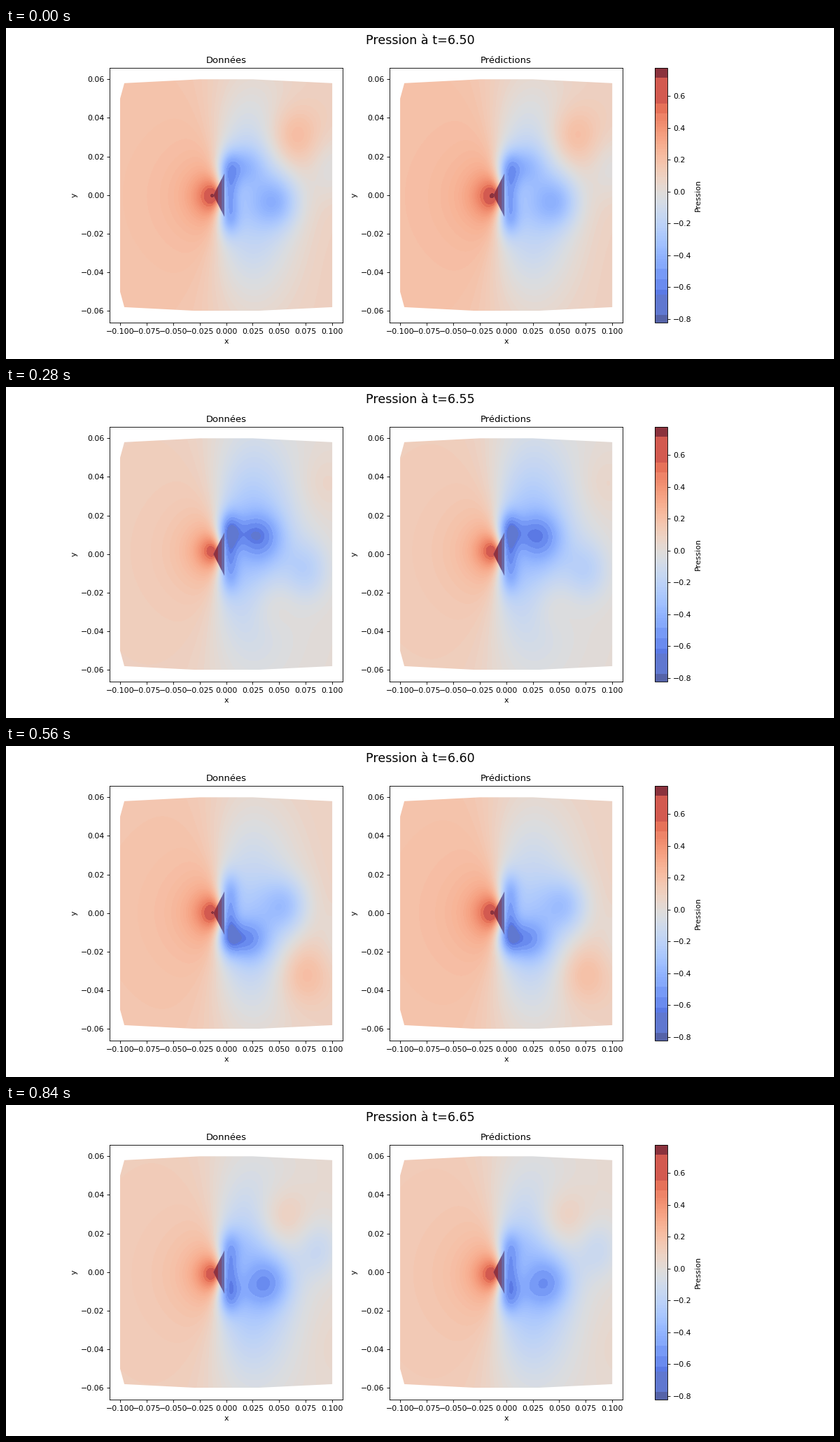
These frames come from a looping animation (1183 by 473 pixels, 0.98 s). A matplotlib script:

```python
import numpy as np
import matplotlib.pyplot as plt
from matplotlib.animation import FuncAnimation
from matplotlib.cm import ScalarMappable
from matplotlib.colors import ListedColormap, Normalize, to_rgba

FRAMES, STEP = 7, 140
W, H, DPI = 1183, 473, 1183 / 15
PMIN, PMAX, LEVELS = -0.824, 0.777, 100
PERIOD = 6.7                      # vortex shedding, in frames
TIDE = 3.6                        # rise and fall of the mean pressure
KX, KY = 1515.5, 2759.0           # pixels per data unit

plt.rcParams["font.family"] = "DejaVu Sans"

x = np.linspace(-0.1, 0.1, 456)
y = np.linspace(-0.06, 0.06, 498)
U, V = np.meshgrid(x * KX, y * KY)


def bump(u, v, su, sv):
    return np.exp(-((U - u) / su) ** 2 / 2 - ((V - v) / sv) ** 2 / 2)


def bell(value, center, width):
    return np.exp(-((value - center) / width) ** 2)


def swing(frame, lag=0.0):
    return np.sin(2 * np.pi * (frame - lag) / PERIOD)


def vortex(age, sign):
    """Pressure of one vortex, the arm feeding it and the pocket behind it."""
    u = 25 + 10 * age + 1.3 * age ** 2
    v = 26 + 16 * np.cos(2 * np.pi * age / 7.4)
    growth = np.clip((age + 1) / 1.5, 0, 1)
    core = 0.28 * growth * bell(age, 2.2, 4.8)
    arm = 0.12 * growth * bell(age, 1.2, 1.5)
    pocket = 0.21 * bell(age, 6.6, 1.9)
    late = age - 6
    return (pocket * bump(78 + 22 * late, sign * (74 + 9 * late), 27, 32)
            - core * bump(u, sign * v, 21 + 0.3 * age, 20 + 1.8 * age)
            - arm * bump((u + 4) / 2, sign * (v + 34) / 2, 18, 15))


def pressure(frame, panel):
    tide = np.cos(2 * np.pi * frame / TIDE)

    # Stagnation zone ahead of the body
    d = np.hypot(U + 18, V - 4 * swing(frame, 0.6))
    front = 0.125 + 0.015 * panel + 0.035 * tide + 0.62 / (1 + (d / 20) ** 1.7)

    # Wide depression behind it
    wake = 0.055 + 0.045 * tide - 0.36 * bump(35, 15 * swing(frame), 45, 95)
    side = np.abs(V)
    edge = (U + 8 + 0.12 * side) / (3 + 0.1 * side)
    share = 1 / (1 + np.exp(np.clip(edge, -50, 50)))
    p = share * front + (1 - share) * wake

    # Suction along the back face and around its two tips
    p -= 0.28 * bump(4, 0, 9, 30)
    for sign in (1, -1):
        p -= (0.18 + 0.08 * sign * swing(frame)) * bump(3, 36 * sign, 12, 18)

    # Vortex street, alternating above and below
    for k in range(-3, 3):
        age = frame - k * PERIOD / 2
        if age > -1:
            p += (1 - 0.05 * panel) * vortex(age, 1 - 2 * (k % 2))
    return p


def palette():
    span = PMAX - PMIN
    mid = PMIN + (np.arange(LEVELS) + 0.5) * span / LEVELS
    coarse = np.round(mid / 0.065) * 0.065
    value = np.where(np.abs(mid) > 0.45, coarse, mid)
    colors = plt.get_cmap("coolwarm")((value - PMIN) / span)
    colors[mid > 0.55] = to_rgba("#d35a50")
    colors[mid > 0.71] = to_rgba("#8b323d")
    colors[mid < -0.65] = to_rgba("#6078d0")
    colors[mid < -0.78] = to_rgba("#5563a8")
    return ListedColormap(colors)


def wedge(size):
    """Triangle growing from the nose of the body."""
    back, half = -18 + 15.5 * size, 31 * size
    return [(-18 / KX, 0), (back / KX, half / KY), (back / KX, -half / KY)]


def mix(a, b, t):
    return (1 - t) * np.array(to_rgba(a)) + t * np.array(to_rgba(b))


fig, axes = plt.subplots(1, 2, figsize=((W + 0.001) / DPI, (H + 0.001) / DPI),
                         dpi=DPI)
norm, cmap = Normalize(PMIN, PMAX), palette()
fig.colorbar(ScalarMappable(norm, cmap), ax=list(axes), label="Pression",
             ticks=np.arange(-4, 4) / 5)
heading = fig.suptitle("", fontsize=16)

# Right half of the outline, mirrored for the left; the inlet corners are cut
right = [(0.025, 0.06), (0.1, 0.058), (0.1, -0.058), (0.025, -0.06)]
left = [(-0.025, -0.06), (-0.096, -0.058), (-0.1, -0.05),
        (-0.1, 0.05), (-0.096, 0.058), (-0.025, 0.06)]

images = []
for ax, name in zip(axes, ("Données", "Prédictions")):
    im = ax.imshow(np.zeros_like(U), norm=norm, cmap=cmap, origin="lower",
                   aspect="auto", extent=(-0.1, 0.1, -0.06, 0.06),
                   interpolation="bilinear")
    im.set_clip_path(plt.Polygon(right + left, transform=ax.transData))
    images.append(im)
    for size, red in ((1, 0.1), (0.75, 0.5), (0.4, 1)):
        ax.add_patch(plt.Polygon(wedge(size), lw=0,
                                 fc=mix("#646eb0", "#91323f", red)))
    ax.set(xlim=(-0.11, 0.11), ylim=(-0.066, 0.066), xlabel="x", ylabel="y",
           title=name)
    ax.set_xticks(np.arange(-4, 5) / 40)
    ax.set_yticks(np.arange(-3, 4) / 50)


def draw(frame):
    for panel, im in enumerate(images):
        im.set_data(pressure(frame, panel))
    heading.set_text(f"Pression à t={6.501 + 0.025 * frame:.2f}")
    return []


anim = FuncAnimation(fig, draw, frames=FRAMES, init_func=lambda: draw(0),
                     interval=STEP, repeat=True, repeat_delay=0, blit=False)
plt.show()
```
